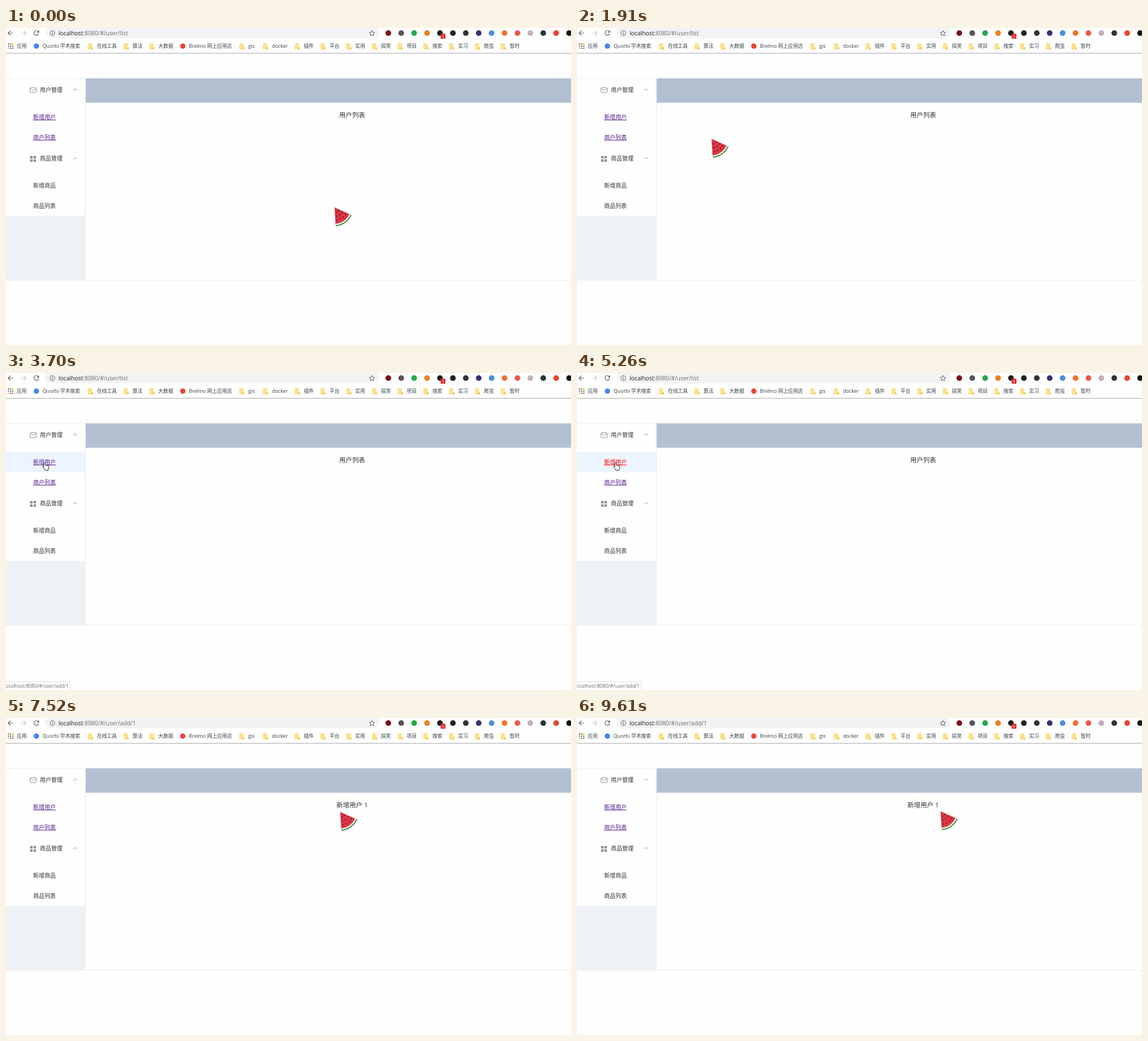
Recreate the animation shown at these times as an HTML page. Size 999 by 560 pixels, loop 9.7 s.

```html
<!DOCTYPE html>
<html lang="zh">
<head>
<meta charset="utf-8">
<style>
html, body { margin: 0; width: 100%; height: 100%; overflow: hidden; background: #fefefe; }
svg { display: block; }
text { font-family: "Open Sans", "Noto Sans CJK SC", "Noto Sans CJK", sans-serif; white-space: pre; }
.bar { font-size: 8.8px; fill: #3c4043; }
.menu { font-size: 10px; fill: #303133; }
.link { fill: #551a8b; text-decoration: underline; }
.title { font-size: 11.5px; fill: #333; text-anchor: middle; }
.url { font-size: 10.5px; letter-spacing: -.1px; fill: #6b6e72; }
.line { fill: none; stroke: #5f6368; stroke-width: 1.2; }
.grey { fill: none; stroke: #909399; }
</style>
</head>
<body>
<svg width="999" height="560" viewBox="0 0 999 560">
  <!-- browser bar -->
  <rect x="70" y="-2" width="590" height="20" rx="10" fill="#f1f3f4"/>
  <path class="line" d="M12.500 9H4M8 4.700L3.700 9L8 13.300"/>
  <path class="line" style="stroke:#c4c6c8" d="M26.500 9H35M31 4.700L35.300 9L31 13.300"/>
  <path class="line" d="M57 6A4.200 4.200 0 1 0 57.800 10"/>
  <path d="M58.500 4V8.300H54.200Z" fill="#5f6368"/>
  <circle class="line" cx="82" cy="9" r="4.300" style="stroke-width:1"/>
  <path class="line" d="M82 8.300V11.500M82 6.300V7.400"/>
  <text class="url" x="93" y="12.700"><tspan fill="#202124">localhost</tspan>:8080/#/user/<tspan id="route"></tspan></text>
  <path class="line" style="stroke-width:1" d="M647 4.300L648.400 7.500L651.900 7.800L649.200 10.100L650 13.500L647 11.700L644 13.500L644.800 10.100L642.100 7.800L645.600 7.500Z"/>
  <g id="tools"></g>
  <rect x="768.500" y="10" width="8.500" height="9" rx="1.500" fill="#e02f36"/>
  <text x="772.700" y="17.600" font-size="8" fill="#fff" text-anchor="middle">1</text>
  <g id="bookmarks"></g>
  <rect y="44" width="999" height="1.400" fill="#bcbcbc"/>

  <!-- page -->
  <rect y="88.500" width="999" height="1" fill="#eee"/>
  <rect y="89" width="141" height="356" fill="#eef1f6"/>
  <rect y="89.500" width="141" height="242.500" fill="#fefefe"/>
  <rect id="hover" y="139.500" width="140" height="35.500" fill="#ecf5ff"/>
  <rect x="140" y="89" width="1" height="243" fill="#e9e9ea"/>
  <rect x="141" y="89" width="858" height="43" fill="#b3c0d1"/>
  <rect y="445" width="999" height="1" fill="#eee"/>
  <rect class="grey" x="42.500" y="105.500" width="11" height="8.500" rx="1"/>
  <path class="grey" d="M42.500 106.500L48 110.500L53.500 106.500"/>
  <path d="M42.500 226h4.500v4.500h-4.500zm6 0h4.500v4.500h-4.500zm-6 6h4.500v4.500h-4.500zm6 0h4.500v4.500h-4.500z" fill="#909399"/>
  <path class="grey" d="M119 110.500L122.300 107.300L125.600 110.500M119 231.700L122.300 228.500L125.600 231.700"/>
  <text class="menu" x="60" y="112.700">用户管理</text>
  <text class="menu link" id="add" x="48" y="161">新增用户</text>
  <text class="menu link" x="48" y="196.500">用户列表</text>
  <text class="menu" x="60" y="234.300">商品管理</text>
  <text class="menu" x="48" y="281.700">新增商品</text>
  <text class="menu" x="48" y="317.700">商品列表</text>
  <text class="title" id="title" x="612" y="158.400"></text>

  <g id="status">
    <rect x="-1.500" y="545.500" width="115" height="16" rx="2" fill="#fff" stroke="#dcdcdc"/>
    <text class="url" x="111" y="556.300" text-anchor="end" style="font-size:8.800px">localhost:8080/#/user/add/1</text>
  </g>

  <g id="melon">
    <path d="M0 0L30 13.500A33 33 0 0 1 2 33Z" fill="#38854a"/>
    <path d="M0 0L28.400 12.800A31.200 31.200 0 0 1 1.900 31.200Z" fill="#f3f3dc"/>
    <path d="M0 0L26.200 11.800A28.700 28.700 0 0 1 1.700 28.700Z" fill="#da3644"/>
    <g id="seeds" fill="#3d1218"></g>
  </g>
  <path id="hand" fill="#fff" stroke="#111" stroke-width=".9" d="M-1.500 8.500V1.600a1.300 1.300 0 0 1 2.600 0V5.400q1.200-.8 2.200.5 1.200-.7 2.100.5 1.700-.4 1.700 1.400V10.200q0 1.400-1 2.800V14.200H.2q-.8-2.200-2.700-4.100-1.700-1.900-.8-2.500t1.800.9Z"/>
</svg>
<script>
const $ = id => document.getElementById(id);
const dot = (x, y, r, fill) => `<circle cx="${x}" cy="${y}" r="${r}" fill="${fill}"/>`;
const [red, green, blue, gold] = ['#ea4335', '#34a853', '#4285f4', '#fbbc05'];

const tools = ['#7c1218', '#555', '#22a84c', '#ee7f22', '#1c1c1c', '#222', '#333', '#3f3070',
  '#4a90d9', '#ee742c', '#e8594c', '#c2afc0', '#2e3338', '#e5452f', '#111'];
$('tools').innerHTML = tools.map((fill, i) => dot(676 + i * 22.83, 9, 5, fill)).join('');

// Bookmarks follow each other; each is as wide as its label
const label = (x, s) => `<text class="bar" x="${x}" y="35.300">${s}</text>`;
const folder = x =>
  `<path d="M${x} 27h7.500v7h1.500v4h-9z" fill="#fde18a"/><path d="M${x + 6.5} 34h2.500v4h-2.500z" fill="#efc85c"/>`;
const marks = { 'Quorbi 学术搜索': blue, 'Brelmo 网上应用店': red };
const names = 'Quorbi 学术搜索,在线工具,算法,大数据,Brelmo 网上应用店,gis,docker,插件,平台,实用,搞笑,项目,搜索,实习,爬虫,暂时';
let left = 48.7, bookmarks = label(19, '应用');
for (let i = 0; i < 9; i++)
  bookmarks += dot(4.4 + i % 3 * 3.8, 28.2 + Math.floor(i / 3) * 3.8, 1.3, [red, green, gold, blue][i % 4]);
for (const name of names.split(',')) {
  bookmarks += (marks[name] ? dot(left + 5, 32, 4.7, marks[name]) : folder(left)) + label(left + 16, name);
  left += 27.9;
  for (const c of name) left += c < '~' ? 4.7 : 8.8;
}
$('bookmarks').innerHTML = bookmarks;

// Seeds sit on three rings around the tip
for (let ring = 1; ring <= 3; ring++)
  for (let i = 0; i < ring + 1; i++) {
    const angle = .42 + 1.1 * (i + .5) / (ring + 1), r = 2 + ring * 7;
    $('seeds').innerHTML += dot(r * Math.cos(angle), r * Math.sin(angle), 1, 'inherit');
  }

// Moves of the pointer in screen ticks: from, to, target x and y, ease-out power, height of the bow
const moves = [
  [-1, 4, 485, 233, 1, 0],
  [5, 16, 238, 196, 2.2, -10],
  [21, 33, 54, 146, 1.3, 5],
  [34, 39, 68.5, 157.5, 1, 0],
  [75, 88, 591, 166, 2.4, 64],
  [88, 97, 645, 165, 1, -8],
  [110, 115, 643, 165, 1, 0]
];
const ramp = (k, from, to) => Math.min(1, Math.max(0, (k - from) / (to - from)));

function pointer(k) {
  let x = 581, y = 317;
  for (const [from, to, toX, toY, power, bow] of moves) {
    const u = ramp(k, from, to), ease = 1 - (1 - u) ** power;
    x += (toX - x) * ease;
    y += (toY - y) * ease + bow * Math.sin(Math.PI * u);
  }
  return [x, y];
}

function draw(now) {
  const k = Math.floor((now % 9700 - 660) / 77.75);
  const [x, y] = pointer(k), onMenu = x < 141, added = k >= 63;
  $('melon').style.display = onMenu ? 'none' : '';
  $('hand').style.display = onMenu ? '' : 'none';
  $(onMenu ? 'hand' : 'melon').setAttribute('transform', `translate(${x} ${y})`);
  $('hover').style.opacity = ramp(k, 27, 37) - ramp(k, 75, 79);
  $('status').style.opacity = ramp(k, 34, 38) - ramp(k, 79, 84);
  $('add').style.fill = k >= 59 && !added ? '#f00' : '';
  $('route').textContent = added ? 'add/1' : 'list';
  $('title').textContent = added ? '新增用户 1' : '用户列表';
  requestAnimationFrame(draw);
}
draw(0);
</script>
</body>
</html>
```
